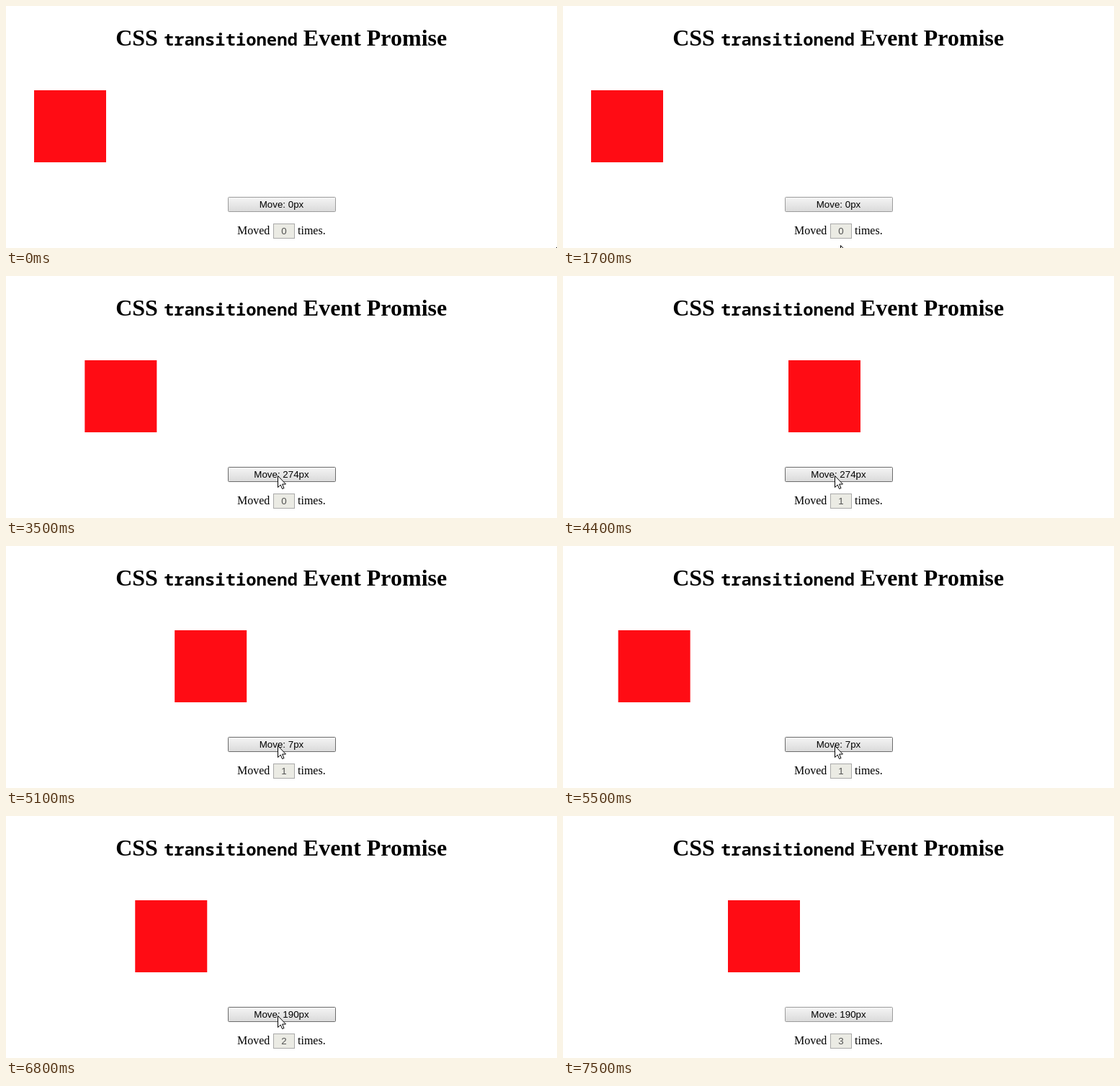
Write an HTML page that moves like this. It is 765 by 336 pixels and loops after 8.8 s.

```html
<!DOCTYPE html>
<html lang="en">
<head>
<meta charset="utf-8">
<title>CSS transitionend Event Promise</title>
<style>
  html, body { margin: 0; width: 100%; height: 100%; overflow: hidden; background: #fff; }
  svg { display: block; width: 765px; height: 336px; font-kerning: none; }
  .title { font: bold 32px "Liberation Serif", "Times New Roman", serif; }
  .code { font: bold 23.83px "Noto Sans Mono", Consolas, monospace; }
  .body { font: 16px "Liberation Serif", "Times New Roman", serif; }
  .control { font: 13.333px "Liberation Sans", Arial, sans-serif; text-anchor: middle; }
</style>
</head>
<body>
<svg viewBox="0 0 765 336">
  <defs>
    <linearGradient id="raised" x2="0" y2="1">
      <stop stop-color="#f5f5f5"/><stop offset="1" stop-color="#dadada"/>
    </linearGradient>
    <linearGradient id="sunken" x2="0" y2="1">
      <stop stop-color="#dadada"/><stop offset="1" stop-color="#f5f5f5"/>
    </linearGradient>
  </defs>

  <text class="title" x="152.2" y="55">CSS</text>
  <text class="code" x="218.9" y="55">transitionend</text>
  <text class="title" x="412.8" y="55">Event Promise</text>

  <rect id="box" x="39" y="117" width="100" height="100" fill="#ff0c14"/>

  <rect id="button" x="308.5" y="265.5" width="149" height="20" rx="1"/>
  <text id="label" class="control" x="382.5" y="280"></text>

  <text class="body" x="321" y="317">Moved</text>
  <rect x="371.5" y="302.5" width="29" height="20" fill="#ebebe4" stroke="#a9a9a9"/>
  <text id="count" class="control" x="386" y="317" fill="#545454"></text>
  <text class="body" x="405" y="317">times.</text>

  <path id="cursor" d="M.5 .5V16.5L4.2 13L6.6 18.5L9 17.5L6.6 12H11.5Z" fill="#fff" stroke="#000"/>
  <rect id="speck" x="764" y="335" width="1" height="1"/>
</svg>
<script>
const LOOP = 8800, STEP = 100, MOVE = 1000;
const ENTER = 1700, ARRIVE = 2400, LEAVE = 7500, SPECK_END = 900;
const clicks = [
  { down: 3200, up: 3317, to: 274 },
  { down: 4800, up: 4900, to: 7 },
  { down: 6200, up: 6366, to: 190 }
];
const [box, button, label, count, cursor, speck] =
  ['box', 'button', 'label', 'count', 'cursor', 'speck'].map(id => document.getElementById(id));

// CSS "ease": cubic-bezier(.25, .1, .25, 1)
function ease(x) {
  if (x <= 0 || x >= 1) return x <= 0 ? 0 : 1;
  const curve = (s, a, b) => 3 * a * s * (1 - s) ** 2 + 3 * b * s * s * (1 - s) + s ** 3;
  let lo = 0, hi = 1;
  for (let i = 0; i < 24; i++) {
    const mid = (lo + hi) / 2;
    if (curve(mid, .25, .25) < x) lo = mid; else hi = mid;
  }
  return curve(lo, .1, 1);
}

function show(el, on) {
  el.setAttribute('visibility', on ? 'visible' : 'hidden');
}

function draw(t) {
  let x = 0, target = 0, moves = 0, pressed = false;
  for (const { down, up, to } of clicks) {
    if (t >= down && t < up) pressed = true;
    if (t < up) break;
    x += (to - x) * ease((t - up) / MOVE);
    target = to;
    if (t > up + MOVE) moves++;
  }

  const inside = t >= ENTER && t < LEAVE;
  const p = Math.min(1, (t - ENTER) / (ARRIVE - ENTER));
  const rest = (1 - p) ** 2;
  const cx = Math.round(377 + 8 * rest), cy = Math.round(277 + 55 * rest);

  box.setAttribute('transform', `translate(${x} 0)`);
  label.textContent = `Move: ${target}px`;
  count.textContent = moves;
  button.setAttribute('fill', `url(#${pressed ? 'sunken' : 'raised'})`);
  button.setAttribute('stroke', inside && cy < 286 ? '#6c6c6c' : '#9c9c9c');
  cursor.setAttribute('transform', `translate(${cx} ${cy})`);
  show(cursor, inside);
  show(speck, t < SPECK_END);
}

const start = performance.now();
function tick() {
  const t = (performance.now() - start) % LOOP;
  draw(Math.floor(t / STEP) * STEP);
  requestAnimationFrame(tick);
}
tick();
</script>
</body>
</html>
```
